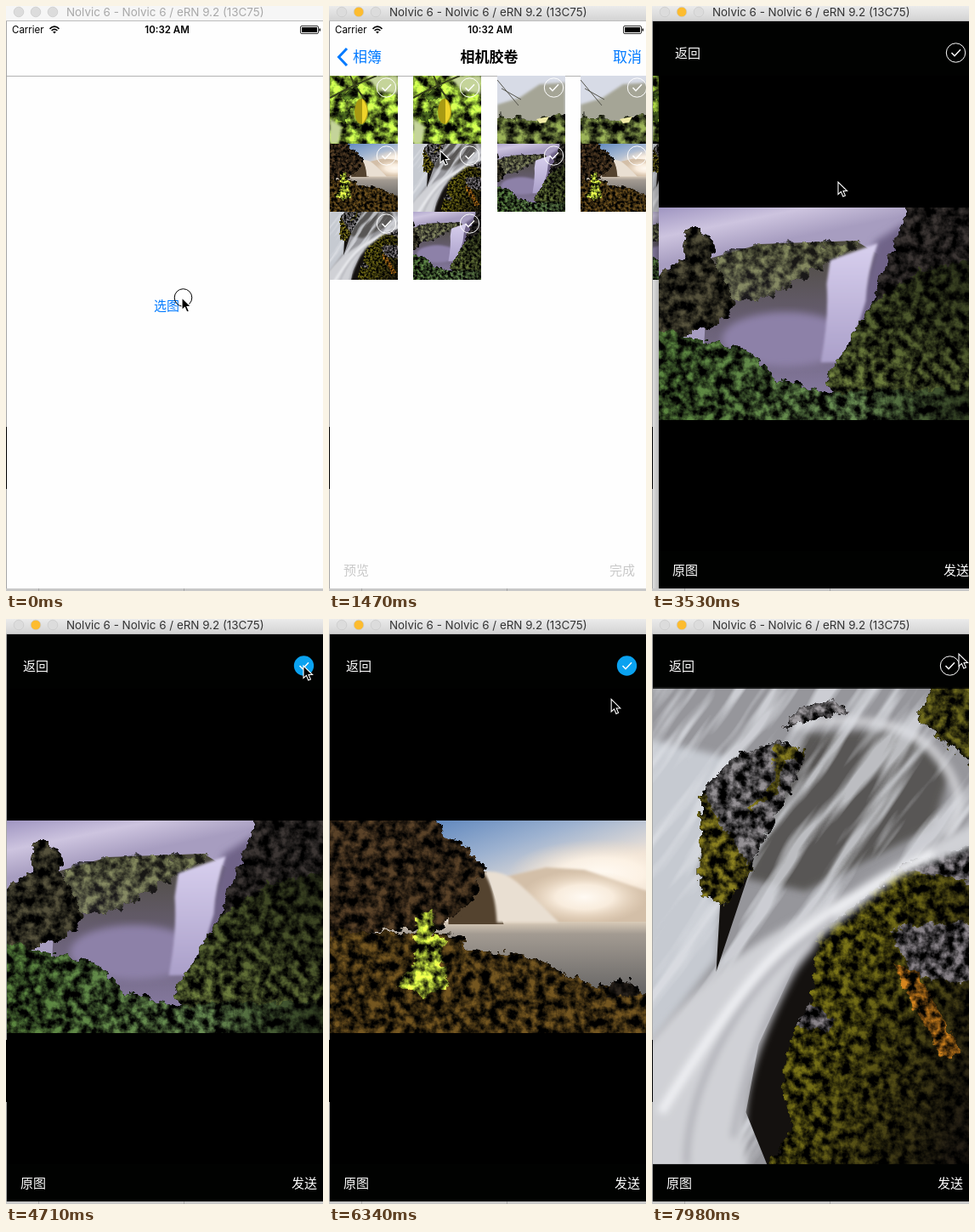
An HTML page for the animation above (8000 ms loop, 373 px wide and 688 px high).

```html
<!DOCTYPE html>
<html lang="zh">
<head>
<meta charset="utf-8">
<title>Photo picker</title>
<style>
html, body { margin: 0; width: 100%; height: 100%; overflow: hidden; background: #c8c8c8; }
svg { display: block; }
text { font: 15px "Noto Sans CJK SC", "Noto Sans CJK", sans-serif; fill: #007aff; }
.nav { font-size: 17px; }
.latin { font-family: Inter, Roboto, sans-serif; }
.status { font-size: 11.5px; fill: #000; }
.mid { text-anchor: middle; }
.white text { fill: #fff; }
.off { display: none; }
</style>
</head>
<body>
<svg width="373" height="688" viewBox="0 0 373 688">
<defs>
  <linearGradient id="chrome" x2="0" y2="1"><stop stop-color="#ebebeb"/><stop offset="1" stop-color="#d2d2d2"/></linearGradient>
  <linearGradient id="edge"><stop stop-opacity="0"/><stop offset="1" stop-opacity=".2"/></linearGradient>
  <linearGradient id="vSky" x2=".3" y2="1"><stop stop-color="#9f95c1"/><stop offset=".13" stop-color="#cdc4df"/><stop offset=".25" stop-color="#a79dc0"/></linearGradient>
  <linearGradient id="vHill" x2="0" y2="1"><stop stop-color="#4c4a3b"/><stop offset=".5" stop-color="#665d70"/><stop offset="1" stop-color="#85799f"/></linearGradient>
  <linearGradient id="vFall" x2="0" y2="1"><stop stop-color="#d8d0ee"/><stop offset="1" stop-color="#aa9fc9"/></linearGradient>
  <linearGradient id="vCliff" x1="1" x2=".3" y2="1"><stop stop-color="#10120a"/><stop offset="1" stop-color="#3b4421"/></linearGradient>
  <linearGradient id="vGrass"><stop stop-color="#2c421e"/><stop offset=".6" stop-color="#35472a"/><stop offset="1" stop-color="#12160b"/></linearGradient>
  <linearGradient id="sSky" x1=".3" x2=".5" y2=".4"><stop stop-color="#5c85bd"/><stop offset=".5" stop-color="#9db2d0"/><stop offset="1" stop-color="#eee3d8"/></linearGradient>
  <radialGradient id="sGlow"><stop stop-color="#fffaf3"/><stop offset=".45" stop-color="#fff4e6" stop-opacity=".85"/><stop offset="1" stop-color="#f0dcc4" stop-opacity="0"/></radialGradient>
  <linearGradient id="sLake" x2="0" y2="1"><stop stop-color="#d9cbb8"/><stop offset=".15" stop-color="#a39b92"/><stop offset="1" stop-color="#5c5c5d"/></linearGradient>
  <linearGradient id="wMoss" x2="1" y2=".6"><stop stop-color="#4d490d"/><stop offset=".5" stop-color="#38350b"/><stop offset="1" stop-color="#120f0a"/></linearGradient>
  <filter id="soft"><feGaussianBlur stdDeviation="4"/></filter>
  <filter id="haze"><feGaussianBlur stdDeviation="1.5"/></filter>

  <!-- Ragged edges and grain for rock, moss and leaves -->
  <filter id="rough" color-interpolation-filters="sRGB">
    <feTurbulence type="fractalNoise" baseFrequency=".09" numOctaves="4" seed="3" result="noise"/>
    <feDisplacementMap in="SourceGraphic" in2="noise" scale="16" xChannelSelector="R" yChannelSelector="G" result="shape"/>
    <feColorMatrix in="noise" values="2.4 0 0 0 -.75  2.4 0 0 0 -.75  2.4 0 0 0 -.75  0 0 0 0 1" result="grain"/>
    <feComposite in="shape" in2="grain" operator="arithmetic" k1="2"/>
  </filter>
  <!-- Long pale strands for running water -->
  <filter id="strands" x="0" y="0" width="1" height="1" color-interpolation-filters="sRGB">
    <feTurbulence type="fractalNoise" baseFrequency=".006 .045" numOctaves="3" seed="5"/>
    <feColorMatrix values="0 0 0 0 .87  0 0 0 0 .88  0 0 0 0 .9  4 0 0 0 -1.8"/>
  </filter>
  <clipPath id="view"><path d="M1 18H373V685H1z"/></clipPath>

  <symbol id="violet" viewBox="0 0 373 250" preserveAspectRatio="xMidYMid slice">
    <path fill="url(#vSky)" d="M0 0H373V250H0z"/>
    <path fill="url(#vHill)" d="M60 60L120 43 232 39 300 80V220H50z"/>
    <path fill="#4c5034" opacity=".7" filter="url(#rough)" d="M66 58L120 43 240 42 190 70 120 110 80 105z"/>
    <ellipse cx="150" cy="155" rx="75" ry="32" fill="#8d81a8" filter="url(#soft)"/>
    <path fill="#6f6488" filter="url(#soft)" d="M255 40L295 15 258 130 220 170z"/>
    <path fill="url(#vFall)" filter="url(#haze)" d="M202 62L258 42Q246 75 244 110L222 182H191Q201 130 198 90z"/>
    <g filter="url(#rough)">
      <path fill="#2b291e" d="M-20 95L30 60 33 24H48L66 44 62 58 92 112 70 138 -20 160z"/>
      <path fill="#1e1b1a" d="M265 75L302 -20H400V110L250 112z"/>
      <path fill="url(#vCliff)" d="M400 50L310 75 252 112 197 204 215 235H400z"/>
      <path fill="url(#vGrass)" d="M-20 138L105 168 140 202 200 218 400 210V280H-20z"/>
    </g>
  </symbol>

  <symbol id="sunny" viewBox="0 0 373 250" preserveAspectRatio="xMidYMid slice">
    <path fill="url(#sSky)" d="M0 0H373V250H0z"/>
    <ellipse cx="320" cy="62" rx="110" ry="40" fill="url(#sGlow)"/>
    <path fill="#d3bfa8" filter="url(#haze)" d="M208 66L255 55 300 58 380 85V122H208z"/>
    <ellipse cx="300" cy="90" rx="75" ry="32" fill="url(#sGlow)"/>
    <path fill="url(#sLake)" d="M60 119H373V215H60z"/>
    <path fill="#54432f" d="M140 60H185L205 122H140z"/>
    <path fill="#e9dfd2" filter="url(#haze)" d="M181 60Q203 58 220 72T270 120H197Q195 80 181 60z"/>
    <g filter="url(#rough)">
      <path fill="#2d2114" d="M-20 -20H115L138 20 165 32 183 60 158 105 130 125 -20 135z"/>
      <path fill="#3a2b10" d="M-20 130L150 134 165 152 240 160 300 190 400 210V280H-20z"/>
      <path fill="#17130f" d="M326 206L336 187 356 190 367 207z"/>
      <path fill="#7c8c29" d="M104 105L122 108 122 135 142 140 130 155 142 195 112 208 78 190 100 170z"/>
    </g>
  </symbol>

  <symbol id="stream" viewBox="0 0 373 562" preserveAspectRatio="xMidYMid slice">
    <path fill="#96969b" d="M0 0H373V562H0z"/>
    <g filter="url(#soft)">
      <path fill="#c6cad1" d="M-10 60L100 85 52 220 80 260 75 320 -10 430z"/>
      <path fill="#595654" d="M180 55L300 50 350 100 330 165 180 240 110 225z"/>
      <path fill="none" stroke="#d2d2d5" stroke-width="9" d="M165 45Q290 25 335 80T345 175"/>
    </g>
    <rect x="-465" width="680" height="630" transform="rotate(-55)" filter="url(#strands)" opacity=".75"/>
    <path fill="#14110f" d="M75 335L80 250 120 200zM185 290L125 420 110 500 135 562H373V250z"/>
    <g filter="url(#rough)">
      <path fill="#38360f" d="M342 -20H400V115L312 35z"/>
      <path fill="#504e50" d="M155 48Q165 22 210 15L235 28z"/>
      <path fill="#4a484a" d="M57 122L100 80 150 64 182 80 132 180 85 260z"/>
      <path fill="#454010" d="M57 120L72 145 118 215 86 258 56 240zM145 66L182 78 152 92 148 125 108 150 145 110z"/>
      <path fill="#474447" d="M400 178L295 208 260 260 280 300 400 330z"/>
      <path fill="url(#wMoss)" d="M292 213L195 288 188 370 160 420 152 470 166 515 135 562 230 590H400V330L300 280 400 275V235z"/>
      <path fill="#454245" d="M282 292L300 278 400 290V352L310 340zM170 398L187 370 214 392 208 407z"/>
      <path fill="#6b430f" d="M282 322L312 335 365 430 340 435z"/>
    </g>
    <g filter="url(#soft)" fill="none">
      <path fill="#d0d1d6" d="M385 160Q300 196 235 240C165 275 70 320 -10 428V575H115Q95 500 135 405T210 285L290 222 385 185z"/>
      <path stroke="#f0f1f4" stroke-width="10" d="M330 195Q200 265 150 310T10 500"/>
      <path stroke="#a0a0a8" stroke-width="5" d="M215 270Q130 330 85 410T40 562M190 305Q120 380 95 530"/>
    </g>
  </symbol>

  <symbol id="lemon" viewBox="0 0 80 80">
    <path fill="#6d8a2a" filter="url(#rough)" d="M-20 -20H100V100H-20z"/>
    <path fill="#c5d49a" filter="url(#haze)" d="M42 0H80V22L58 18zM0 50L14 60 10 80H0z"/>
    <path fill="none" stroke="#38401c" stroke-width="2" d="M0 26Q30 10 55 0M42 28Q30 15 24 0"/>
    <path fill="#324615" filter="url(#rough)" d="M8 24L36 12 30 30zM2 45L26 38 18 56z"/>
    <ellipse cx="37" cy="42" rx="8" ry="15" fill="#a89a13"/>
    <path fill="#efd42a" d="M38 27Q50 42 38 57z"/>
  </symbol>

  <symbol id="dune" viewBox="0 0 80 80">
    <path fill="#d7dbe6" d="M0 0H80V80H0z"/>
    <path fill="#a5a596" filter="url(#haze)" d="M0 34L26 26 50 10 80 8V55H0z"/>
    <path fill="#4e5a2c" filter="url(#rough)" d="M-20 48L40 50 100 44V100H-20z"/>
    <path fill="none" stroke="#55554c" d="M0 5L25 35M5 15L28 28"/>
    <path fill="#f1eca8" d="M46 51L61 48 57 55 50 56z"/>
  </symbol>

  <g id="tick" fill="none" stroke="#fff">
    <circle r="11.2"/><path stroke-width="1.5" d="M-5 0L-1.5 3.7 5.5-3.8"/>
  </g>
  <g id="ticked" fill="none" stroke="#fff">
    <circle r="11.7" fill="#0aa2f0" stroke="none"/><path stroke-width="1.5" d="M-5 0L-1.5 3.7 5.5-3.8"/>
  </g>
  <g id="statusBar">
    <text class="latin status" x="7" y="32.3">Carrier</text>
    <path fill="none" stroke="#000" stroke-width="1.6" d="M51.5 26.8Q57 21.5 62.5 26.8M53.6 29Q57 25.8 60.4 29"/>
    <path d="M55.2 30.6Q57 29 58.8 30.6L57 32.5z"/>
    <text class="latin status mid" x="189.5" y="32.3" style="font-weight:600">10:32 AM</text>
    <rect x="346.5" y="23.5" width="21" height="9" rx="1.5" fill="none" stroke="#000" stroke-width=".8"/>
    <path d="M348 25H366V31H348zM368.5 26.5H370V29.5H368.5z"/>
  </g>
  <g id="page">
    <path fill="#fefefe" d="M1 18H373V685H1z"/>
    <path fill="#b2b2b2" d="M1 82H373V83H1z"/>
  </g>
</defs>

<path fill="#c8c8c8" d="M0 0H373V688H0z"/>
<path fill="#a6a6a6" d="M0 18H1V685H0zM38 685H39V688H38zM209 685H210V688H209z"/>
<path d="M0 495H1V568H0z"/>

<path id="bar" d="M0 0H373V18H0z"/>
<path fill="#bdbdbd" d="M0 17H373V18H0z"/>
<g stroke="#c9c9c9" stroke-width=".7" fill="#dcdcdc">
  <circle cx="15" cy="7" r="5.8"/><circle id="amber" cx="35" cy="7" r="5.8"/><circle cx="55" cy="7" r="5.8"/>
</g>
<text id="title" class="latin" x="71" y="12" style="font-size:13.4px">Nolvic 6 - Nolvic 6 / eRN 9.2 (13C75)</text>

<g clip-path="url(#view)">
  <use href="#page"/>
  <text x="174" y="357.5">选图</text>

  <g id="picker">
    <use href="#page"/>
    <path fill="none" stroke="#007aff" stroke-width="3" d="M21 50L11.5 60 21 70"/>
    <text class="nav" x="28" y="66">相簿</text>
    <text class="nav mid" x="188.5" y="66" style="fill:#000;font-weight:700">相机胶卷</text>
    <text class="nav" x="334" y="66">取消</text>
    <g id="grid"></g>
    <use id="picked" href="#ticked"/>
    <g id="tools"><text x="17" y="668.5">预览</text><text x="330" y="668.5">完成</text></g>
    <g id="badge"><circle r="10" fill="#8dfa78"/><text class="latin mid" y="5.5" style="fill:#fff">1</text></g>
  </g>
  <use id="status" href="#statusBar"/>
  <path id="dim" d="M1 18H373V685H1z"/>
  <path id="cover" d="M1 18H373V82H1z"/>

  <g id="detail" class="white">
    <path fill="url(#edge)" d="M-7 82H1V685H-7z"/>
    <path d="M1 18H373V685H1z"/>
    <g id="pager">
      <use href="#violet" x="1" y="237" width="372" height="250"/>
      <use href="#sunny" x="373" y="237" width="372" height="250"/>
      <use href="#stream" x="745" y="80" width="372" height="562"/>
    </g>
    <path fill="#020302" opacity=".85" d="M1 18H373V82H1zM1 641H373V685H1z"/>
    <text x="20" y="60.5">返回</text>
    <text x="17" y="668.5">原图</text><text x="336" y="668.5">发送</text>
    <use id="mark" x="350.5" y="55"/>
  </g>
</g>

<g id="pointer">
  <circle id="press" cx="1.5" r="10.3" fill="none" stroke="#000"/>
  <path stroke="#fff" stroke-width="1.1" d="M0 0V14.5L3.4 11.4 5.8 17 8.4 15.9 6 10.5H10.6z"/>
</g>
</svg>

<script>
const $ = id => document.getElementById(id);
const LOOP = 8000, STEP = 147.6, LEAD = 18;
const WIDTH = 372, HEIGHT = 668;

const photos = 'lemon lemon dune dune sunny stream violet sunny stream violet'.split(' ');
$('grid').innerHTML = photos.map((name, i) => {
  const x = 1 + Math.round(i % 4 * 98.4), y = 82 + (i >> 2) * 80;
  return `<use href="#${name}" x="${x}" y="${y}" width="80" height="80"/><use href="#tick" x="${x + 66.5}" y="${y + 14}"/>`;
}).join('');

// Pointer stops; it clicks on arrival wherever it lingers.
const stops = [
  { from: 0, to: 5, x: 207, y: 343 },
  { from: 10, to: 10, x: 131, y: 170 },
  { from: 12, to: 17, x: 166, y: 176 },
  { from: 20, to: 26, x: 219, y: 207 },
  { from: 30, to: 32, x: 350, y: 55 },
  { from: 37, to: 37, x: 241, y: 262 },
  { from: 40, to: 42, x: 350, y: 55 },
  { from: 49, to: 50, x: 225, y: 331 },
  { from: 52, to: 54, x: 361, y: 41, idle: true }
];

// 0 to 1, fast at first, settling like a released scroll view.
const glide = (k, start) => k < start ? 0 : 1 - Math.exp(-2 * (k - start));
const bounce = d => 1 + .15 * Math.exp(-d) * Math.cos(Math.PI * d);

function pointerAt(k) {
  const i = stops.findLastIndex(s => s.from <= k), a = stops[i], b = stops[i + 1];
  if (k <= a.to || !b) return [a.x, a.y];
  const f = (k - a.to) / (b.from - a.to);
  return [a.x + (b.x - a.x) * f, a.y + (b.y - a.y) * f];
}
const set = (id, name, value) => $(id).setAttribute(name, value);
const move = (id, x, y, s = 1) => set(id, 'transform', `translate(${x} ${y}) scale(${s})`);
const show = (id, on) => $(id).classList.toggle('off', !on);

function draw(k) {
  const active = k > 0, picked = k >= 13, pushed = k >= 22;
  set('bar', 'fill', active ? 'url(#chrome)' : '#f6f6f6');
  set('amber', 'fill', active ? '#fdbc2f' : '#dcdcdc');
  $('title').style.fill = active ? '#333' : '#a8a8a8';

  const push = glide(k, 22), scale = bounce(k - 13);
  move('picker', pushed ? -1 - 111 * push : 0, Math.round(HEIGHT * (1 - glide(k, 5.55))));
  show('picked', picked);
  show('badge', picked);
  move('picked', 166.5, 176, scale);
  move('badge', 315, 662.5, scale);
  for (const label of $('tools').children) label.style.fill = picked ? '#007aff' : '#c9c9c9';

  show('status', !pushed);
  show('cover', pushed);
  show('detail', pushed);
  set('dim', 'opacity', push * .1);
  move('detail', Math.round(WIDTH * (1 - push)), 0);
  move('pager', -Math.round(WIDTH * (glide(k, 35.8) + glide(k, 48.975))), 0);
  const on = k >= 31 && k < 39 || k >= 41 && k < 52;
  set('mark', 'href', on ? '#ticked' : '#tick');

  move('pointer', ...pointerAt(k));
  show('press', stops.some(s => s.from === k && s.to > k && !s.idle));
}

let last = -1;
function frame() {
  const k = Math.floor((performance.now() % LOOP + LEAD) / STEP);
  if (k !== last) draw(last = k);
  requestAnimationFrame(frame);
}
frame();
</script>
</body>
</html>
```
